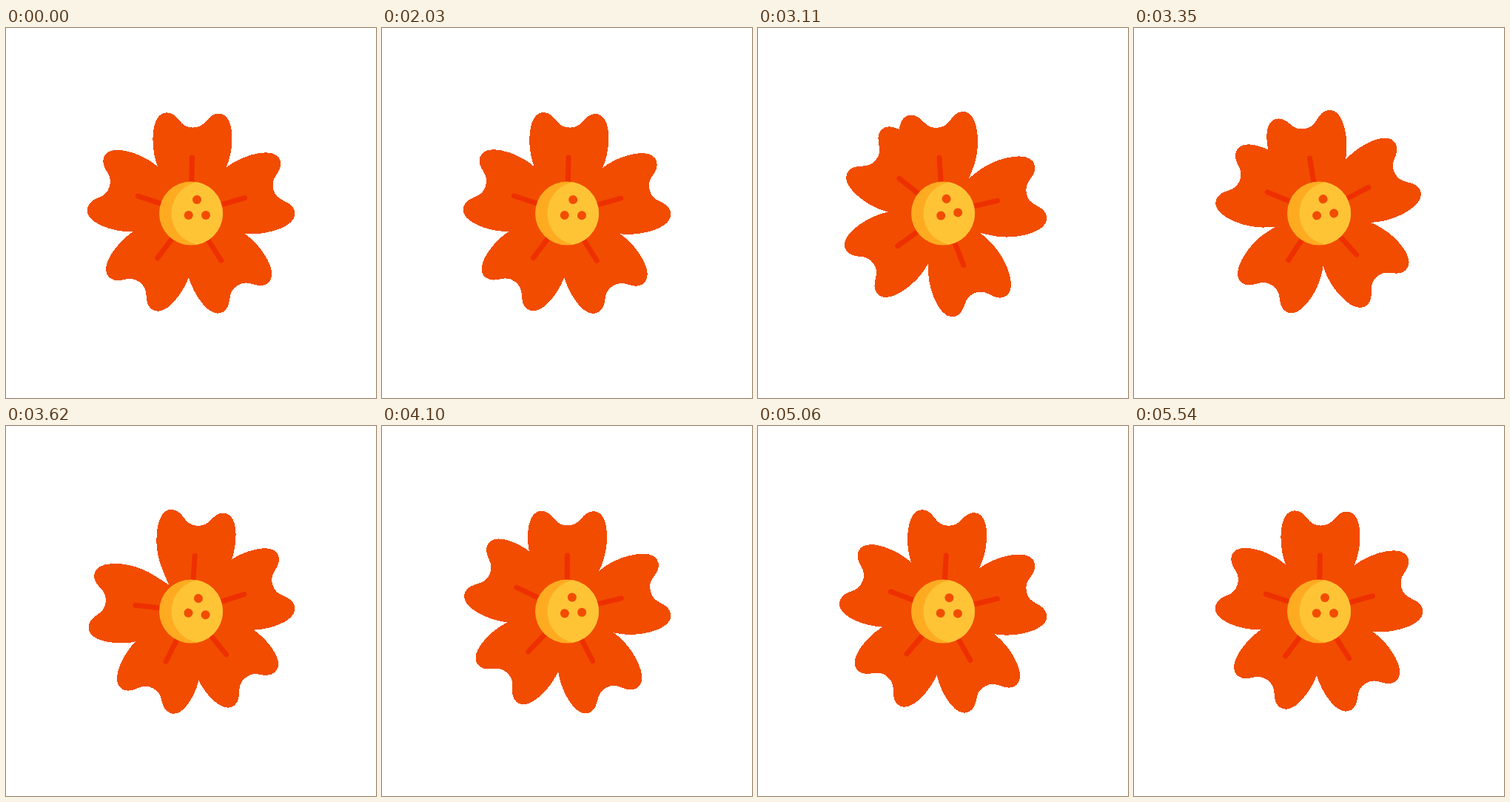
Animation of 500x500 px, one loop 5570 ms. Source, as an HTML page:

```html
<!DOCTYPE html>
<html lang="en">
<head>
<meta charset="utf-8">
<title>Swaying flower</title>
<style>
  html, body { margin: 0; width: 100%; height: 100%; overflow: hidden; background: #fff; }
  svg { display: block; width: 100%; height: 100%; }
</style>
</head>
<body>
<svg viewBox="0 0 500 500">
  <defs>
    <path id="half" d="M0-116C-8-116-13-119-18-125C-23-131-28-135.5-35-135.5C-46-135.5-53.5-124-53.5-100C-53.5-86-50.5-73-46.5-63C-42-52-36-41-27-23L0 0H1V-116Z"/>
    <g id="petal" fill="#f24c00" shape-rendering="crispEdges">
      <use href="#half"/>
      <use href="#half" transform="scale(-1 1)"/>
    </g>
    <path id="vein" d="M0-30V-75.5" stroke="#ee3000" stroke-width="7" stroke-linecap="round"/>
    <clipPath id="core"><circle r="43"/></clipPath>
  </defs>
  <g transform="translate(250 250.5)">
    <g id="petals"></g>
    <g id="veins"></g>
    <circle r="43" fill="#ffab21"/>
    <circle cx="16.5" r="43" fill="#ffc436" clip-path="url(#core)"/>
    <g id="dots" fill="#f24c00">
      <circle cx="8" cy="-18.5" r="6"/>
      <circle cx="-3.3" cy="2.5" r="6"/>
      <circle cx="20" cy="2.5" r="6"/>
    </g>
  </g>
</svg>
<script>
const LOOP = 5570, START = 2020, END = 5540;
const FIRST_PEAK = 2665, SWING = 520, LAG = 85;
const PEAKS = [20.7, -11.8, 7.5, -5.2, 3.6, 0];
const REST = [1.1, 74, 147.3, 216.8, 288];

const $ = id => document.getElementById(id);

function addUse(parent, href) {
  const el = document.createElementNS('http://www.w3.org/2000/svg', 'use');
  el.setAttribute('href', href);
  return parent.appendChild(el);
}

const petals = REST.map(angle => ({
  angle,
  parts: [addUse($('petals'), '#petal'), addUse($('veins'), '#vein')]
}));

// Damped swing; each later part reaches its peaks a little later.
function sway(t, order) {
  const peakTime = i => Math.min(FIRST_PEAK + order * LAG + i * SWING, END);
  if (t <= START) return 0;
  if (t < peakTime(0)) {
    return PEAKS[0] * Math.sin(Math.PI / 2 * (t - START) / (peakTime(0) - START));
  }
  for (let i = 1; i < PEAKS.length; i++) {
    const from = peakTime(i - 1), to = peakTime(i);
    if (t < to) {
      const ease = (1 - Math.cos(Math.PI * (t - from) / (to - from))) / 2;
      return PEAKS[i - 1] + (PEAKS[i] - PEAKS[i - 1]) * ease;
    }
  }
  return 0;
}

const rotate = (el, deg) => el.setAttribute('transform', `rotate(${deg})`);

function draw(t) {
  rotate($('dots'), sway(t, 0));
  petals.forEach(({ angle, parts }, i) => {
    const deg = angle + sway(t, i + 1);
    parts.forEach(el => rotate(el, deg));
  });
}

const begin = performance.now();
function tick() {
  draw((performance.now() - begin) % LOOP);
  requestAnimationFrame(tick);
}
tick();
</script>
</body>
</html>
```
